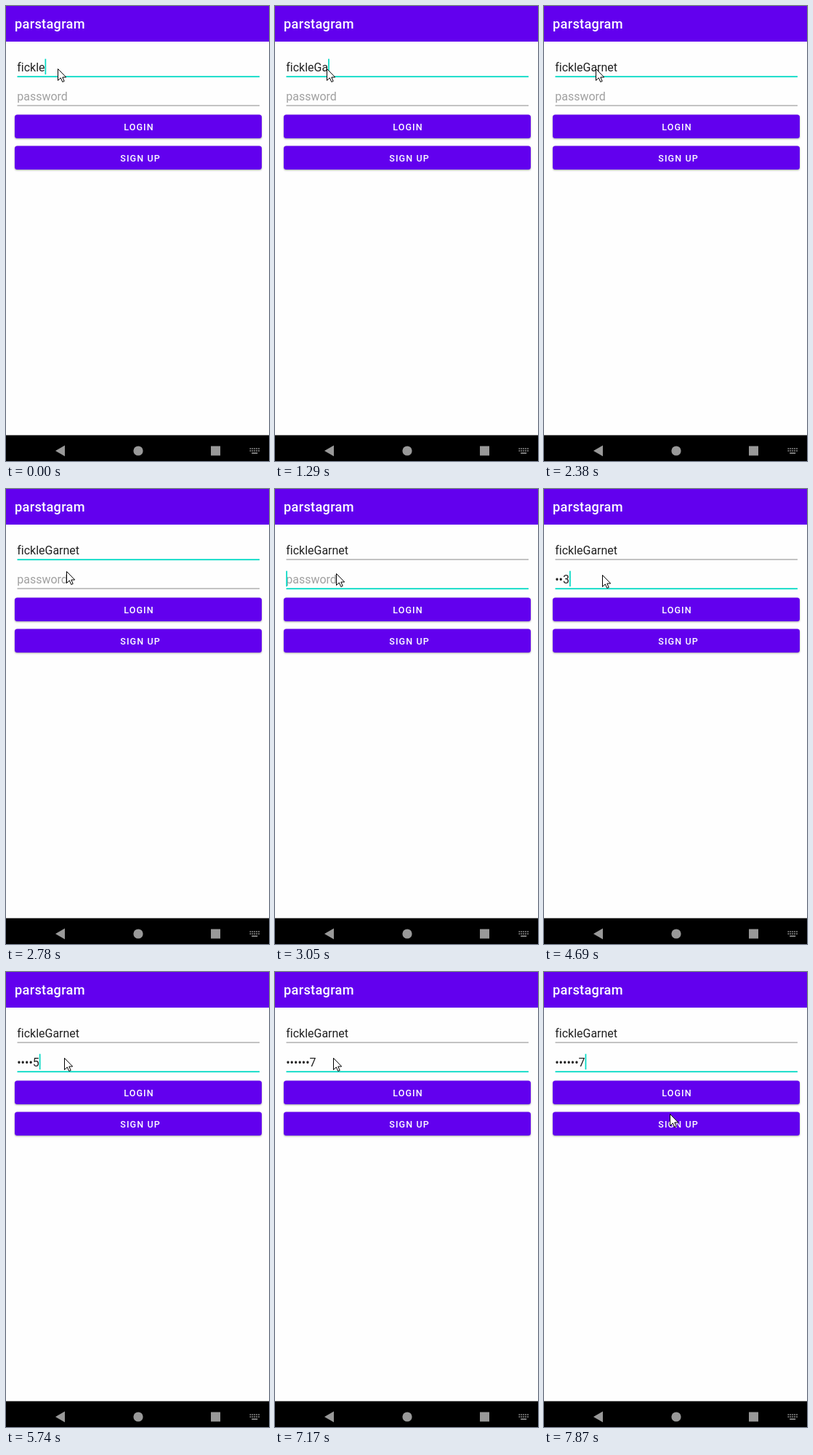
Animation of 362 by 626 pixels, one loop 7990 ms. Source, as an HTML page:

```html
<!DOCTYPE html>
<html lang="en">
<head>
<meta charset="utf-8">
<title>Login form</title>
<style>
  html, body { margin: 0; width: 100%; height: 100%; overflow: hidden; background: #fefefe; }
  svg { display: block; width: 100%; height: 100%; }
  text { font-family: Roboto, sans-serif; font-variant-ligatures: none; }
  .title { font-size: 18.2px; font-weight: 500; letter-spacing: .3px; fill: #fff; }
  .field { font-size: 16px; fill: #212121; }
  .hint { fill: #a0a0a0; }
  .button rect { fill: #6200ee; filter: drop-shadow(0 1px 1px rgba(0, 0, 0, .35)); }
  .button text { font-size: 12.5px; font-weight: 500; letter-spacing: .0893em; text-anchor: middle; fill: #fff; }
  .underline { fill: #8a8a8a; }
  .underline.focused, #caret { fill: #03dac5; }
  .nav { fill: #999; }
</style>
</head>
<body>
<svg viewBox="0 0 362 626">
  <rect width="362" height="626" fill="#fefefe"/>
  <rect width="362" height="49" fill="#6200ee"/>
  <text class="title" x="12" y="31">parstagram</text>

  <text class="field" id="name" x="15.2" y="90"></text>
  <text class="field hint" id="hint" x="15.2" y="130">password</text>
  <text class="field" id="pass" x="15.2" y="130"></text>
  <rect class="underline" x="15.5" width="333.5"/>
  <rect class="underline" x="15.5" width="333.5"/>
  <rect id="caret" width="1.7" height="21.5"/>

  <g class="button">
    <rect x="12" y="149.5" width="340" height="32.5" rx="3.5"/>
    <text x="183" y="171">LOGIN</text>
  </g>
  <g class="button">
    <rect x="12" y="192.5" width="340" height="32.5" rx="3.5"/>
    <text x="185" y="214">SIGN UP</text>
  </g>

  <rect y="590.5" width="362" height="36"/>
  <g class="nav">
    <path d="M68 612 81 604.5V619.5Z"/>
    <circle cx="182" cy="612" r="6.6"/>
    <rect x="282" y="605.5" width="13" height="13"/>
    <path d="M335.5 609H349M335.5 612H349" stroke="#999" stroke-width="1.7" stroke-dasharray="1.8 1.1"/>
    <rect x="338.2" y="614.4" width="8" height="1.6"/>
  </g>

  <path id="pointer" d="M.5.5V16.5L4.3 12.9 6.8 18.5 9.2 17.4 6.8 12H11.7Z" fill="#fff" stroke="#000"/>
</svg>
<script>
  const LOOP = 7990;
  const USER = 'fickleGarnet';
  const $ = id => document.getElementById(id);
  const lines = document.querySelectorAll('.underline');

  // name and pass count typed characters; focus 0 is the name field
  const steps = [
    [0, { name: 6, pass: 0, focus: 0, caret: true, x: 71, y: 86 }],
    [280, { name: 7 }],
    [430, { name: 8 }],
    [870, { caret: false }],
    [1020, { name: 7, caret: true }],
    [1290, { name: 8 }],
    [1590, { name: 9 }],
    [1740, { name: 10 }],
    [1860, { name: 11 }],
    [1980, { name: 12 }],
    [2380, { caret: false }],
    [2660, { x: 77, y: 99 }],
    [2780, { x: 83, y: 113 }],
    [2930, { caret: true, x: 84, y: 116 }],
    [3050, { focus: 1 }],
    [3330, { x: 80, y: 118 }],
    [3610, { caret: false }],
    [4010, { caret: true }],
    [4130, { pass: 1 }],
    [4410, { pass: 2 }],
    [4690, { pass: 3 }],
    [5270, { pass: 4 }],
    [5740, { pass: 5 }],
    [6180, { pass: 6 }],
    [6610, { pass: 7 }],
    [7170, { caret: false }],
    [7320, { x: 122, y: 149 }],
    [7450, { x: 164, y: 179 }],
    [7590, { caret: true, x: 165, y: 179 }],
    [7870, { x: 173, y: 195 }]
  ];

  const stateAt = time =>
    Object.assign({}, ...steps.filter(([start]) => start <= time).map(([, change]) => change));

  // Only the last typed digit is readable
  const masked = count => count ? '•'.repeat(count - 1) + count : '';

  function draw(time) {
    const s = stateAt(time);
    $('name').textContent = USER.slice(0, s.name);
    $('pass').textContent = masked(s.pass);
    $('hint').style.display = s.pass ? 'none' : '';

    lines.forEach((line, i) => {
      const focused = i === s.focus;
      line.classList.toggle('focused', focused);
      line.setAttribute('y', 96.3 + i * 40 + (focused ? 0 : .2));
      line.setAttribute('height', focused ? 1.8 : 1);
    });

    const active = s.focus ? $('pass') : $('name');
    const width = active.textContent ? active.getComputedTextLength() : 0;
    $('caret').setAttribute('x', 15.2 + width);
    $('caret').setAttribute('y', 72.7 + s.focus * 40);
    $('caret').style.display = s.caret ? '' : 'none';
    $('pointer').setAttribute('transform', `translate(${s.x} ${s.y})`);
  }

  const begin = performance.now();
  function tick() {
    draw((performance.now() - begin) % LOOP);
    requestAnimationFrame(tick);
  }
  tick();
</script>
</body>
</html>
```
